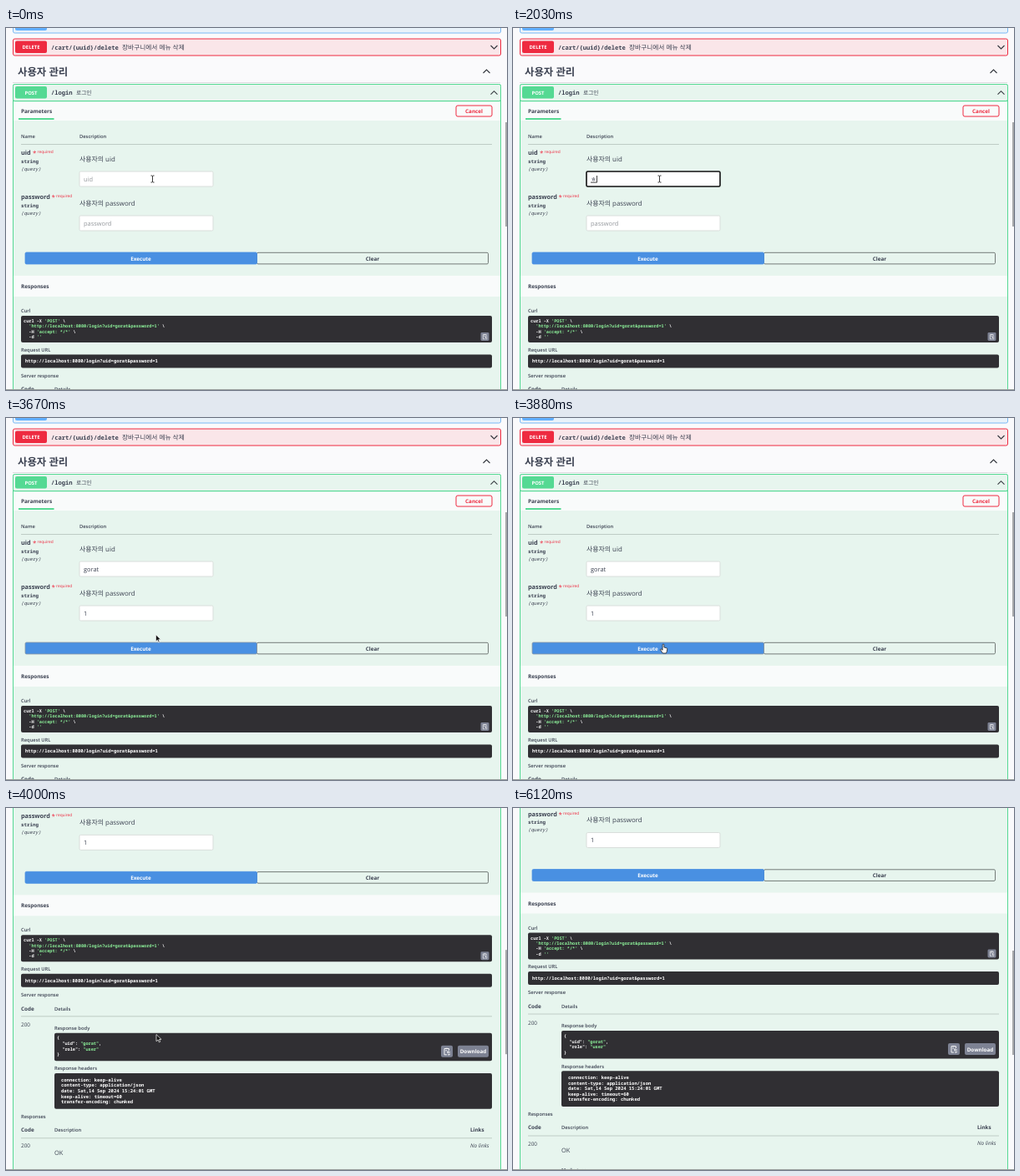
An HTML page for the animation above (6180 ms loop, 600x434 px).

```html
<!DOCTYPE html>
<html lang="ko">
<head>
<meta charset="utf-8">
<title>API page</title>
<style>
html, body { margin: 0; width: 100%; height: 100%; overflow: hidden; background: #fafafc; }
svg { display: block; width: 600px; height: 434px; }
text { font-family: "Open Sans", "Noto Sans CJK KR", "Noto Sans CJK", sans-serif; fill: #3b4151;
  white-space: pre; text-rendering: geometricPrecision; }
.b { font-weight: 700; }
.s { font-weight: 600; }
.i { font-style: italic; }
.m { font-family: "Noto Sans Mono", "DejaVu Sans Mono", monospace; }
.w { fill: #fff; }
.r { fill: #ee2a40; }
.c { text-anchor: middle; }
.g { fill: #8df29a; }
</style>
</head>
<body>
<svg viewBox="0 0 600 434"><g id="page"></g><g id="over"></g></svg>
<script>
const LOOP = 6180, SCROLL = 195.5, USER = "gorat";
const $ = id => document.getElementById(id);
const esc = s => s.replace(/&/g, "&amp;").replace(/</g, "&lt;");

// Drawing helpers; each returns SVG markup.
const raw = (x, y, size, cls, body, id = "") =>
  `<text id="${id}" x="${x}" y="${y}" font-size="${size}" class="${cls}">${body}</text>`;
const text = (x, y, size, cls, s) => raw(x, y, size, cls, esc(s));
const rect = (x, y, w, h, fill, stroke = "none", r = 0, more = "") =>
  `<rect x="${x}" y="${y}" width="${w}" height="${h}" fill="${fill}" stroke="${stroke}" rx="${r}" ${more}/>`;
const path = (d, stroke, w = 1, fill = "none") =>
  `<path d="${d}" stroke="${stroke}" stroke-width="${w}" fill="${fill}"/>`;
const rule = (y, color, x1 = 18, x2 = 582) => path(`M${x1} ${y}H${x2}`, color, .8);
const chevron = (x, y, k) => path(`M${x - 4} ${y - 2 * k}l4 ${4 * k}l4 ${-4 * k}`, "#33363d", 1.1);
const dark = (x, y, h) => rect(x, y, 582 - x, h, "#302f33", "none", 2);
// Quoted parts between backticks are shown as string literals.
const code = (x, y, s, size = 5.22) => raw(x, y, size, "m b w",
  esc(s).split("`").map((p, i) => i % 2 ? `<tspan class="g">${p}</tspan>` : p).join(""));
const copyIcon = (x, y, size) => {
  const k = size / 14;
  return `<g transform="translate(${x} ${y}) scale(${k})">` + rect(0, 0, 14, 14, "#7d8293", "none", 2) +
    path("M9.5 6V3.7H4V11h3M5.5 3.5h2.5M5.3 6h2M11 8H7.5m1.5-1.5L7.4 8L9 9.5M8 11h2.3V9.7", "#fff", .9) + "</g>";
};
const operation = (y, color, fill, name, route, note) =>
  rect(8.5, y, 584, 20, fill, color, 2) + rect(11, y + 2.5, 38, 14.5, color, "none", 2) +
  text(30, y + 12, 5.9, "b w c", name) + text(54, y + 12.5, 7.1, "m s", route) +
  text(note[0], y + 12.5, note[1], "", note[2]);
const field = (y, name, starX, id) =>
  text(18, y, 7.3, "b", name) + text(starX, y + 1, 8, "r", "*") + text(starX + 5.6, y - 2, 4.8, "r", "required") +
  text(18, y + 9.7, 5.8, "m b", "string") + text(18, y + 18.7, 5.7, "m i", "(query)") +
  text(88, y + 7.5, 7.9, "", "사용자의 " + name) +
  rect(88, y + 20, 160, 18, "#fff", "#d9dedb", 1.5, `id="${id}Box"`) +
  raw(93, y + 31.8, 7.4, "", "", id) +
  path("", "#111", .8).replace("<path", `<path id="${id}Caret"`);

const tint = "#e7f5ee", pale = "#f9fbfb", line = "#b4c2bb", green = "#55d993";
const url = `http://localhost:8080/login?uid=${USER}&password=1`;

$("page").innerHTML = [
  rect(8.5, -15, 584, 21, "#e9f2fa", "#7bb9f4", 2), rect(11, -12, 38, 15, "#61affe", "none", 2),
  operation(13, "#ee2a40", "#fae6e9", "DELETE", "/cart/{uuid}/delete", [139, 7.7, "장바구니에서 메뉴 삭제"]),
  chevron(584.5, 23, 1),
  text(14, 57, 12.4, "s", "사용자 관리"), chevron(575.5, 52, -1), rule(65.5, "#d3d4d9", 8, 592),
  rect(8.5, 67.5, 584, 700, tint, green, 2),
  operation(67.5, green, tint, "POST", "/login", [84, 6.7, "로그인"]), chevron(584.5, 77.7, -1),
  rect(9, 88, 583, 23, pale), rule(87.7, green, 9, 592),
  text(18, 102, 6.4, "b", "Parameters"), rect(15, 108, 42.5, 2, green),
  rect(539, 93, 43, 13, "none", "#ee2a40", 2), text(560.5, 102, 6.3, "b r c", "Cancel"),
  text(18, 132, 5.8, "s", "Name"), text(88, 132, 5.8, "s", "Description"), rule(139.5, line),
  field(152, "uid", 32, "uid"), field(205, "password", 54.5, "pw"),
  rect(300.5, 269.3, 277, 13.6, "none", "#737b78", 1.5),
  rect(23, 269, 277.5, 14, "#4990e2", "#4990e2", 1.5, 'id="run" stroke-width=".8"'),
  text(161.5, 278.6, 6.3, "b w c", "Execute"), text(439, 278.6, 6.3, "b c", "Clear"),
  rect(9, 297, 583, 25, pale), text(18, 312, 6.4, "b", "Responses"),
  text(18, 341, 5.8, "s", "Curl"), dark(18, 345, 32),
  code(21, 353, "curl -X `'POST'` \\"), code(21, 359.4, "  `'" + url + "'` \\"),
  code(21, 365.8, "  -H `'accept: */*'` \\"), code(21, 372.2, "  -d `''`"),
  copyIcon(568.5, 365, 10),
  text(18, 387.5, 5.8, "s", "Request URL"), dark(18, 391.5, 16), code(23, 401.3, url, 5.52),
  text(18, 418.5, 5.8, "s", "Server response"),
  text(18, 435.3, 6.3, "b", "Code"), text(58, 435.3, 5.8, "s", "Details"), rule(442.5, line),
  text(18, 455, 6.4, "", "200"), text(58, 458.8, 5.8, "s", "Response body"), dark(58, 462.5, 33.5),
  code(61, 470, "{"), code(61, 477, "  \"uid\": `\"" + USER + "\"`,"),
  code(61, 483.5, "  \"role\": `\"user\"`"), code(61, 490, "}"),
  copyIcon(521, 477.5, 14), rect(541, 477.5, 37, 14, "#7d8293", "none", 2),
  text(559.5, 487, 6.3, "b w c", "Download"),
  text(58, 507.2, 5.8, "s", "Response headers"), dark(58, 510.8, 42.7),
  ...["connection: keep-alive", "content-type: application/json", "date: Sat,14 Sep 2024 15:24:01 GMT",
    "keep-alive: timeout=60", "transfer-encoding: chunked"].map((s, i) => code(66, 520.5 + i * 6.6, s, 5.52)),
  text(18, 564.3, 5.8, "s", "Responses"),
  text(18, 580.8, 6.3, "b", "Code"), text(58, 580.8, 5.8, "s", "Description"), text(556, 580.8, 6.3, "b", "Links"),
  rule(588.5, line),
  text(18, 600, 6.4, "", "200"), text(58, 608.6, 7.4, "", "OK"), text(556, 599.8, 6.4, "i", "No links"),
  text(58, 631, 5.6, "s", "Media type")
].join("");

$("over").innerHTML =
  rect(598, 113, 2, 125, "#a6a8aa", "none", 0, 'id="thumb"') +
  rect(0, 433, 600, 1, "#9aa09d") +
  '<g id="mouse">' +
  `<g id="beam">${path("M-2 -4h1.5l.5.5l.5-.5H2M0-3.5v7M-2 4h1.5l.5-.5l.5.5H2", "#222", .9)}</g>` +
  `<g id="arrow">${path("M0 0v8.2l2-1.8l1.3 2.9l1.4-.6l-1.3-2.8h2.6z", "#fff", .7, "#111")}</g>` +
  `<g id="hand">${path("M-.9 0q.9-1 1.8 0v3.5l3.2.8q.8.3.7 1.2l-.6 3.2l-.8 1.8H-.6l-3-4.2q.3-1.2 1.4-.6l1.3 1.1z", "#222", .8, "#fff")}</g>` +
  "</g>";

const clamp = p => Math.max(0, Math.min(1, p));
const ease = p => { p = clamp(p); return p * p * (3 - 2 * p); };

const FOCUS = 1000, TAB = 2700, TAB2 = 3150, JAMO = 1930, ERASE = 2180, TYPE = 2240, KEY = 65, DIGIT = 2900;

function uidValue(t) {
  if (t < JAMO) return "";
  if (t < ERASE) return "ㅎ";
  return t < TYPE ? "" : USER.slice(0, 1 + Math.floor((t - TYPE) / KEY));
}

function showField(id, value, hint, focused, composing, t) {
  const box = $(id + "Box"), label = $(id), y = +label.getAttribute("y");
  box.setAttribute("stroke", focused ? "#111" : "#d9dedb");
  box.setAttribute("stroke-width", focused ? 1.6 : 1);
  label.textContent = value || hint;
  label.style.fill = value ? "#3b4151" : "#93979b";
  const end = 93.3 + (value ? label.getComputedTextLength() : 0);
  let d = focused && t % 1060 < 530 || composing ? `M${end + .4} ${y - 6.8}v8.4` : "";
  if (composing) d += `M93 ${y + 1.3}H${end}`;
  $(id + "Caret").setAttribute("d", d);
}

function draw(t) {
  const scroll = SCROLL * (1 - (1 - clamp((t - 3895) / 140)) ** 3);
  $("page").setAttribute("transform", `translate(0 ${-scroll})`);
  $("thumb").setAttribute("y", 113 + scroll * 58 / SCROLL);

  showField("uid", uidValue(t), "uid", t >= FOCUS && t < TAB, t >= JAMO && t < ERASE, t - FOCUS);
  showField("pw", t < DIGIT ? "" : "1", "password", t >= TAB && t < TAB2, false, t - TAB);
  $("run").setAttribute("stroke", t >= TAB2 && t < 3895 ? "#8c99a3" : "#4990e2");

  const move = ease((t - 3400) / 350), leave = ease((t - 4300) / 600);
  const x = 175.5 + 4.5 * move + 430 * leave, y = 181 + 90.5 * move - 40 * leave;
  const pageY = y + scroll, inside = (a, b) => pageY > a && pageY < b;
  const shape = t > 3895 ? "arrow" : inside(172, 190) || inside(225, 243) ? "beam" : inside(269, 283) ? "hand" : "arrow";
  $("mouse").setAttribute("transform", `translate(${x} ${y})`);
  for (const id of ["beam", "arrow", "hand"]) $(id).style.display = id === shape ? "" : "none";
}

const start = performance.now();
function tick() {
  draw((performance.now() - start) % LOOP);
  requestAnimationFrame(tick);
}
tick();
</script>
</body>
</html>
```
